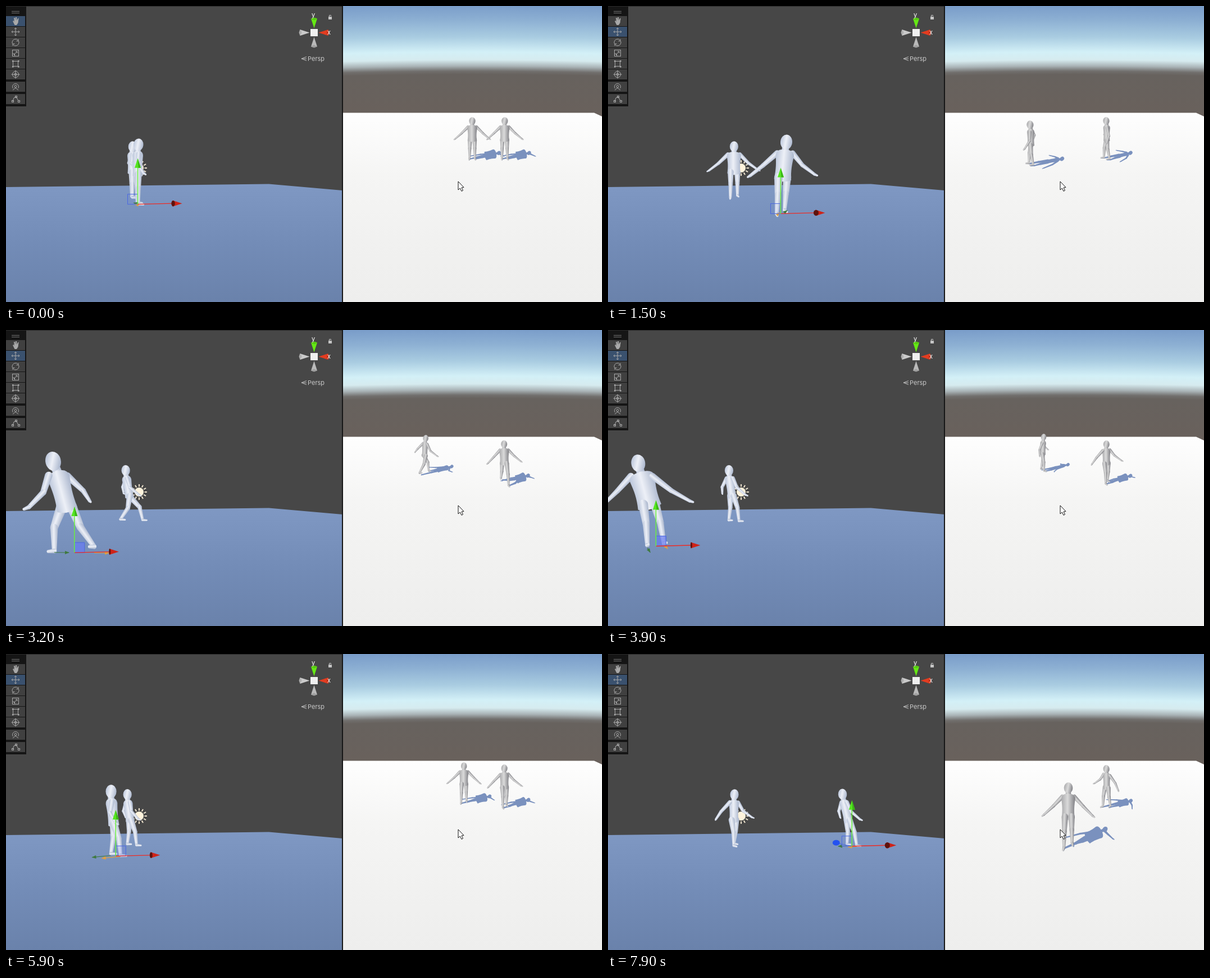
Animation of 1061x528 px, one loop 8 s. Source, as an HTML page with a canvas:

```html
<!DOCTYPE html>
<html lang="en">
<head>
<meta charset="utf-8">
<title>Walk preview</title>
<style>
  html, body { margin: 0; width: 100%; height: 100%; overflow: hidden; background: #474747; }
  canvas { display: block; }
</style>
</head>
<body>
<canvas id="stage" width="1061" height="528"></canvas>
<script>
const ctx = document.getElementById('stage').getContext('2d');
const LOOP = 8000, STEP = 100, STRIDE = 1000, TAU = 2 * Math.PI;

// World unit: one body height. x runs to the right of the scene view, y up, z towards its camera.
// Waypoints: time, x, z, heading in degrees, sideways lean of the head
const walkerPath = [
  [0, 0, .77, 0, 0],
  [1500, .37, 1.73, 90, .08],
  [3200, -.76, 2.06, 225, -.2],
  [4700, -1, 1.08, 325, -.13],
  [5900, -.32, .98, 360, -.08],
  [6700, .54, .79, 360, -.42],
  [7900, 1.85, .87, 360, -.22]
];
// Time, heading, lean: the second body runs on the spot
const idlerTurns = [[0, 0, 0], [1500, 90, 0], [3200, 0, -.13], [4700, -40, -.06], [6300, 0, -.1], [7900, 50, 0]];

const SCENE_SKIN = ['#bac5da', '#edf0f7', '#a9b5cc'];
const GAME_SKIN = ['#a9a9ab', '#dadada', '#7e7e83'];
const SHADOW = Array(3).fill('#7a91be');

const sceneView = ([x, y, z]) => {
  const s = 1 / (.0099 - .0018 * z + .0008 * x);
  return [300 + (x + .25 * z - .75) * s, 271 + (.704 - y) * s, s];
};
const gameView = ([x, y, z]) => {
  const s = 440 / (5.87 - x);
  return [830 - (z - .77) * s, 120 + (2.04 - y) * s, s];
};
const shadowView = ([x, y, z]) => {
  const [px, py, s] = gameView([x - .5 * y, 0, z - .75 * y]);
  return [px, py, s * .6];
};

// Smooth curve through timed rows
function sample(rows, t) {
  let i = 0;
  while (i < rows.length - 2 && t >= rows[i + 1][0]) i++;
  const span = rows[i + 1][0] - rows[i][0], u = Math.min(1, (t - rows[i][0]) / span);
  const slope = (n, c) => {
    const a = rows[Math.max(0, n - 1)], b = rows[Math.min(rows.length - 1, n + 1)];
    return (b[c] - a[c]) / (b[0] - a[0]) * span;
  };
  return rows[i].map((p, c) => {
    const q = rows[i + 1][c], m = slope(i, c), n = slope(i + 1, c);
    return p + u * (m + u * (3 * (q - p) - 2 * m - n + u * (2 * (p - q) + m + n)));
  }).slice(1);
}

function skeleton(t, x, z, heading, lean) {
  const a = heading * Math.PI / 180;
  const place = (forward, side, up) => [
    x + forward * Math.cos(a) - side * Math.sin(a) + lean * Math.pow(Math.max(0, up), 1.4),
    up,
    z + forward * Math.sin(a) + side * Math.cos(a)
  ];
  const swing = Math.min(1, t / 500) * Math.cos(TAU * (t - 200) / STRIDE);
  const limbs = [-1, 1].flatMap(side => {
    const reach = -side * swing * .19, lift = .015 + Math.max(0, -reach) * .25;
    return [
      { radii: [.053, .038, .023], joints: [
        place(0, side * .055, .46), place(reach * .55 + .05 * Math.abs(swing), side * .06, .25),
        place(reach, side * .065, lift), place(reach + .07, side * .075, lift - .01)] },
      { radii: [.036, .027, .018], joints: [
        place(0, side * .1, .765), place(-.03 - reach * .2, side * .25, .61),
        place(.03 - reach * .45, side * .4, .49), place(.05 - reach * .45, side * .43, .475)] }
    ];
  });
  return { limbs, head: place(.01, 0, .905), neck: place(0, 0, .81), hip: place(0, 0, .45),
    shoulders: [-1, 1].map(side => place(0, side * .12, .76)) };
}

function shade(x, y, nx, ny, r, skin) {
  if (nx < 0) { nx = -nx; ny = -ny; }
  const g = ctx.createLinearGradient(x - nx * r, y - ny * r, x + nx * r, y + ny * r);
  skin.forEach((color, i) => g.addColorStop([0, .45, 1][i], color));
  return g;
}

function capsule([ax, ay, as], [bx, by, bs], ra, rb, skin) {
  const a = Math.atan2(by - ay, bx - ax), q = Math.PI / 2;
  ctx.fillStyle = shade((ax + bx) / 2, (ay + by) / 2, -Math.sin(a), Math.cos(a), Math.max(ra * as, rb * bs), skin);
  ctx.beginPath();
  ctx.arc(ax, ay, ra * as, a + q, a + 3 * q);
  ctx.arc(bx, by, rb * bs, a - q, a + q);
  ctx.fill();
}

function drawLimb({ joints, radii }, view, skin) {
  const [root, bend, end, tip] = joints.map(view);
  capsule(root, bend, radii[0], radii[1], skin);
  capsule(bend, end, radii[1], radii[2], skin);
  capsule(end, tip, radii[2], radii[2] * .7, skin);
}

function drawTorso(neck, hip, half, skin) {
  const [nx, ny] = neck, L = Math.hypot(hip[0] - nx, hip[1] - ny) || 1;
  const ux = (hip[0] - nx) / L, uy = (hip[1] - ny) / L;
  const at = (along, side) => [nx + ux * along * L + uy * side * half, ny + uy * along * L - ux * side * half];
  ctx.fillStyle = shade(...at(.5, 0), uy, -ux, half, skin);
  ctx.beginPath();
  ctx.moveTo(...at(0, -.3));
  ctx.quadraticCurveTo(...at(.03, -.95), ...at(.2, -.98));
  ctx.bezierCurveTo(...at(.5, -.85), ...at(.7, -.78), ...at(1.05, -.92));
  ctx.quadraticCurveTo(...at(1.2, 0), ...at(1.05, .92));
  ctx.bezierCurveTo(...at(.7, .78), ...at(.5, .85), ...at(.2, .98));
  ctx.quadraticCurveTo(...at(.03, .95), ...at(0, .3));
  ctx.fill();
}

// depthAxis is the world axis that points at the camera.
function drawBody(bones, view, skin, depthAxis) {
  const [head, neck, hip] = [bones.head, bones.neck, bones.hip].map(view);
  const [left, right] = bones.shoulders.map(view);
  const depth = limb => limb.joints[1][depthAxis];
  const sorted = [...bones.limbs].sort((a, b) => depth(a) - depth(b));
  const middle = bones.hip[depthAxis];
  sorted.filter(limb => depth(limb) <= middle).forEach(limb => drawLimb(limb, view, skin));
  capsule(head, neck, .04, .045, skin);
  drawTorso(neck, hip, Math.max(Math.abs(left[0] - right[0]) / 2, .083 * neck[2]), skin);
  sorted.filter(limb => depth(limb) > middle).forEach(limb => drawLimb(limb, view, skin));
  const [x, y, s] = head;
  ctx.fillStyle = shade(x, y, 1, .2, .078 * s, skin);
  ctx.beginPath();
  ctx.ellipse(x, y, .075 * s, .094 * s, Math.atan2(x - neck[0], neck[1] - y) * .6, 0, TAU);
  ctx.fill();
}

function poly(points, fill) {
  ctx.fillStyle = fill;
  ctx.beginPath();
  points.forEach(([x, y]) => ctx.lineTo(x, y));
  ctx.fill();
}

function stroke(color, width, ...lines) {
  ctx.strokeStyle = color;
  ctx.lineWidth = width;
  ctx.beginPath();
  for (const [x, y, ...rest] of lines) {
    ctx.moveTo(x, y);
    for (let i = 0; i < rest.length; i += 2) ctx.lineTo(rest[i], rest[i + 1]);
  }
  ctx.stroke();
}

function rect(x, y, w, h, fill) {
  ctx.fillStyle = fill;
  ctx.fillRect(x, y, w, h);
}

function ellipse(x, y, rx, ry, fill) {
  ctx.fillStyle = fill;
  ctx.beginPath();
  ctx.ellipse(x, y, rx, ry, 0, 0, TAU);
  ctx.fill();
}

function ring(x, y, r, from = 0, to = TAU) {
  ctx.beginPath();
  ctx.arc(x, y, r, from, to);
  ctx.stroke();
}

function label(text, x, y, size, color) {
  ctx.fillStyle = color;
  ctx.font = `${size}px Inter, sans-serif`;
  ctx.fillText(text, x, y);
}

function rotated(x, y, angle, paint) {
  ctx.save();
  ctx.translate(x, y);
  ctx.rotate(angle);
  paint();
  ctx.restore();
}

function vertical(y0, y1, ...colors) {
  const g = ctx.createLinearGradient(0, y0, 0, y1);
  colors.forEach((color, i) => g.addColorStop(i / (colors.length - 1), color));
  return g;
}

function sceneBackdrop() {
  rect(0, 0, 599, 528, '#474747');
  poly([[0, 323], [468, 317.5], [599, 329], [599, 528], [0, 528]],
    vertical(318, 528, '#7f98c3', '#738cb7', '#6a82ab'));
  rect(0, 0, 599, 1, '#292929');
}

function gameBackdrop() {
  const far = 9115;
  const sky = ctx.createRadialGradient(830, far, far - 190, 830, far, far);
  [[0, '#7b9eca'], [25, '#8db0d3'], [55, '#a9cce1'], [82, '#d3f0f7'], [96, '#d6ebef'],
   [107, '#a9b3b6'], [116, '#716f6d'], [122, '#67625e'], [190, '#69615c']]
    .forEach(([y, color]) => sky.addColorStop(1 - y / 190, color));
  rect(600, 0, 461, 200, sky);
  poly([[600, 190.5], [1047, 190.5], [1061, 197], [1061, 528], [600, 528]],
    vertical(190, 528, '#fefefe', '#f5f5f4', '#f1f1f0', '#eeeeed'));
}

const ICON = '#a9a9a9';
const line = (...lines) => stroke(ICON, 1, ...lines);
// Each icon is drawn around its own centre.
const icons = [
  () => poly([[-5, 0], [-3, -1], [-2, 2], [-3, -6], [-1, -6], [0, -1], [0, -7], [2, -7], [2, -1], [4, -5],
    [5.5, -5], [4.5, 3], [2, 7], [-1.5, 7]], ICON),
  () => {
    for (let i = 0; i < 4; i++) {
      ctx.rotate(TAU / 4);
      line([0, 0, 7, 0], [5, -2, 7, 0, 5, 2]);
    }
  },
  () => {
    for (let i = 0; i < 2; i++) {
      ctx.rotate(Math.PI);
      ring(0, 0, 6, -.4, 2.4);
      line([5, -6, 5, -2.5, 1.5, -2.5]);
    }
  },
  () => {
    ctx.strokeRect(-5.5, -5.5, 11, 11);
    line([-3, 3, 3, -3], [0, -3, 3, -3, 3, 0], [-6, 1.5, -1.5, 1.5, -1.5, 6]);
  },
  () => {
    ctx.strokeRect(-4.5, -4.5, 9, 9);
    for (const x of [-6, 4]) for (const y of [-6, 4]) rect(x, y, 2.5, 2.5, ICON);
  },
  () => {
    ring(0, 0, 5.5);
    ring(0, 0, 2);
    line([-7.5, 0, 7.5, 0], [0, -7.5, 0, 7.5]);
  },
  () => {
    ring(0, 0, 5.5, 2.6, 6.8);
    ring(0, -.5, 2);
    line([-5, 6, 0, 2, 5, 6]);
  },
  () => {
    line([-5, 4, -3, -2, 1, -4, 5, 3]);
    [[-7, 2], [-1, -6], [4, 2]].forEach(([x, y]) => ctx.strokeRect(x + .5, y + .5, 3, 3));
  }
];

function toolbar(active) {
  rect(0, 1, 36, 178, '#151515');
  stroke('#777', 1, [10, 9.5, 24, 9.5], [10, 12.5, 24, 12.5]);
  icons.forEach((icon, i) => {
    const y = 18 + 19 * i + (i > 5 ? 3 : 0) + (i > 6 ? 3 : 0);
    rect(0, y, 34, 18, i === active ? '#3a516e' : '#404040');
    ctx.strokeStyle = ICON;
    ctx.lineWidth = 1;
    rotated(17, y + 9, 0, icon);
  });
}

function compass() {
  ['#cacaca', '#65e814', '#e33c20', '#bababa'].forEach((color, i) => rotated(548.5, 47.5, i * TAU / 4, () => {
    poly([[-8, 0], [-25, -5.5], [-27, 0], [-25, 5.5]], color);
    poly([[-24, -5], [-27, 0], [-25, 5.5], [-22, 0]], 'rgba(0,0,0,.14)');
  }));
  rect(542, 41, 13, 13, '#efefef');
  label('y', 544, 20, 11, '#fff');
  label('x', 572, 51, 11, '#fff');
  label('Persp', 537, 98, 11, '#c9c9c9');
  stroke('#c0c0c0', 1, [535, 90.5, 526, 94, 535, 97.5], [526, 94, 535, 94]);
  rect(574, 19, 6, 5, '#c4c4c4');
  stroke('#c4c4c4', 1, [575.5, 19, 575.5, 16.5, 578.5, 16.5, 578.5, 18]);
}

function sun() {
  ellipse(237, 289, 8, 8, '#fff3dc');
  for (let i = 0; i < 12; i++) {
    rotated(237, 289, i * TAU / 12, () => stroke('#fff3dc', 1.8, [9.5, 0, 14, 0]));
  }
}

function arrow([x0, y0], [x1, y1], color) {
  stroke(color, 1.1, [x0, y0, x1, y1]);
  rotated(x1, y1, Math.atan2(y1 - y0, x1 - x0), () => poly([[1, 0], [-7, -3], [-7, 3]], color));
}

// Every foot trails an arrow against the direction of travel.
function footArrows(t, bones) {
  const from = sample(walkerPath, Math.max(0, t - 50)), to = sample(walkerPath, Math.min(t + 50, 7900));
  const dx = (to[0] - from[0]) * 3, dz = (to[1] - from[1]) * 3;
  [0, 2].forEach((limb, i) => {
    const [x, , z] = bones.limbs[limb].joints[2];
    arrow(sceneView([x, 0, z]), sceneView([x - dx, 0, z - dz]), ['#3f7a3f', '#e0a040'][i]);
  });
}

function moveHandle([x, y]) {
  const flipped = x < 215, left = flipped ? x : x - 18;
  rect(left, y - 18, 18, 18, `rgba(105,125,240,${flipped ? Math.max(.1, Math.min(.75, (y - 350) / 50)) : .08})`);
  stroke('#4a68e2', 1, [left, y - 18, left + 18, y - 18, left + 18, y, left, y, left, y - 18]);
  if (x > 400) {
    stroke('#4a68e2', 1, [x, y, x - 25, y - 5]);
    ellipse(x - 28, y - 6, 6.5, 5, '#2452f0');
  }
  stroke('#ee2b24', 1.3, [x, y, x + 63, y - 1.5]);
  stroke('#6af23c', 1.5, [x, y, x, y - 67]);
  poly([[x + 79, y - 1.5], [x + 62, y - 7], [x + 62, y + 4]], '#cf2318');
  ellipse(x + 63, y - 1.5, 1.5 + 3 * Math.max(0, Math.min(1, x / 150 - 1)), 5.2, '#5e120c');
  poly([[x, y - 82], [x - 5.5, y - 65], [x + 5.5, y - 65]], '#55e620');
  poly([[x, y - 82], [x + 1, y - 65], [x + 5.5, y - 65]], '#3bb615');
}

function pointer() {
  const shape = [[805, 313], [805, 328], [808.4, 325], [811, 330.4], [813.5, 329], [811, 324], [815, 323.5]];
  poly(shape, '#fff');
  stroke('#111', 1, [...shape.flat(), 805, 313]);
}

function draw(t) {
  const [x, z, heading, lean] = sample(walkerPath, t);
  const walker = skeleton(t, x, z, heading, lean);
  const idler = skeleton(t, 0, 0, ...sample(idlerTurns, t));

  sceneBackdrop();
  sun();
  for (const bones of [idler, walker]) drawBody(bones, sceneView, SCENE_SKIN, 2);
  footArrows(t, walker);
  moveHandle(sceneView([x, 0, z]));
  toolbar(t < 500 ? 0 : 1);
  compass();

  gameBackdrop();
  const actors = x < 0 ? [walker, idler] : [idler, walker];
  for (const bones of actors) drawBody(bones, shadowView, SHADOW, 0);
  for (const bones of actors) drawBody(bones, gameView, GAME_SKIN, 0);
  pointer();
  rect(598, 0, 2, 528, '#171717');
}

function tick(now) {
  draw(Math.floor(now % LOOP / STEP) * STEP);
  requestAnimationFrame(tick);
}
requestAnimationFrame(tick);
</script>
</body>
</html>
```
